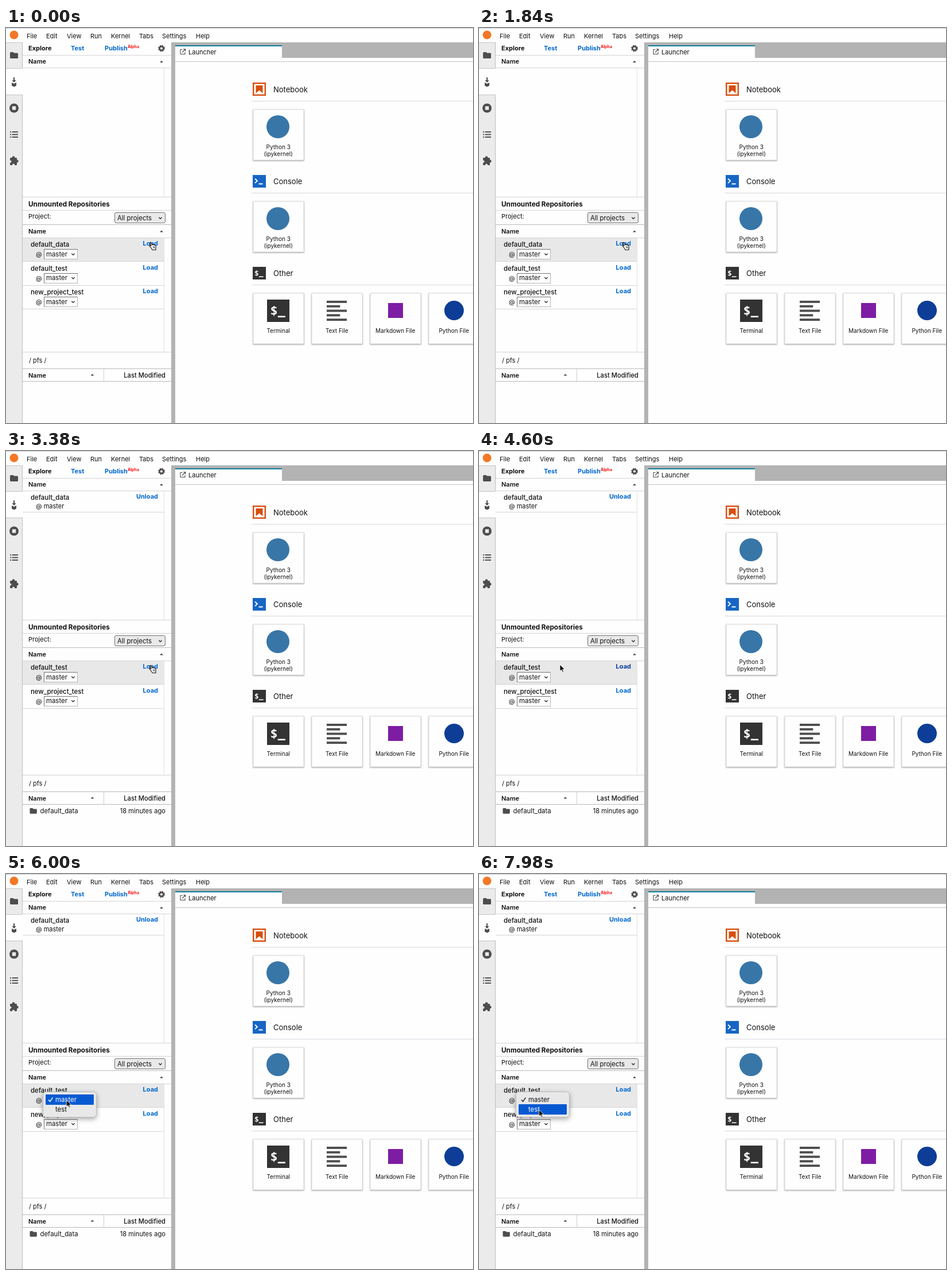
These frames come from a looping animation (814 px wide and 688 px high, 8 s). An HTML page:

```html
<!DOCTYPE html>
<html lang="en">
<head>
<meta charset="utf-8">
<title>Launcher</title>
<style>
html, body { margin: 0; width: 100%; height: 100%; overflow: hidden; background: #fefefe; }
svg { display: block; width: 814px; height: 688px; }
text { font: 11px Inter, "Open Sans", sans-serif; fill: #111; white-space: pre; }
.b { font-weight: 700; }
.m { font-weight: 600; }
.n { font-size: 11.4px; font-weight: 500; }
.v { font-size: 11.4px; }
.link { font-weight: 700; fill: #0067cf; }
.card { font-size: 10px; text-anchor: middle; }
.head { font-size: 13px; }
.mono { font-family: "Noto Sans Mono", monospace; font-weight: 600; fill: #fff; }
.end { text-anchor: end; }
.white { fill: #fff; }
.box { fill: #fefefe; stroke: #dedede; filter: drop-shadow(0 1px 1px #0006); }
</style>
</head>
<body>
<svg id="stage" viewBox="0 0 814 688" xmlns="http://www.w3.org/2000/svg"></svg>
<script>
const LOOP = 8000;
const rect = (x, y, w, h, fill, more = '') =>
  `<rect x="${x}" y="${y}" width="${w}" height="${h}" fill="${fill}" ${more}/>`;
const circle = (x, y, r, fill) => `<circle cx="${x}" cy="${y}" r="${r}" fill="${fill}"/>`;
const text = (x, y, s, cls = '', more = '') => `<text x="${x}" y="${y}" class="${cls}" ${more}>${s}</text>`;
const path = (d, stroke, width = 1, fill = 'none') =>
  `<path d="${d}" fill="${fill}" stroke="${stroke}" stroke-width="${width}"/>`;
const group = (id, body) => `<g id="${id}">${body}</g>`;
const hline = (x, y, w, color = '#d4d4d4') => rect(x, y, w, 1, color);
const chevron = (x, y) => path(`M${x - 2.6} ${y - 1.3}l2.6 2.7 2.6-2.7`, '#222', 1.3);
const sortMark = (x, y) => path(`M${x - 3} ${y + 1.5}l3-3 3 3z`, 'none', 0, '#444');
const folder = (x, y, s) =>
  `<path transform="translate(${x} ${y}) scale(${s})" fill="#4d4d4d" d="M1.5 0h4L7 1.6h5.5q1.5 0 1.5 1.5v6.4q0 1.5-1.5 1.5h-11Q0 11 0 9.5v-8Q0 0 1.5 0z"/>`;

function menuBar() {
  const items = { File: 36, Edit: 70, View: 106, Run: 147, Kernel: 183, Tabs: 232, Settings: 272, Help: 331 };
  return rect(0, 0, 814, 1, '#c9c9d6') + circle(14, 12, 7.5, '#f37726') +
    Object.entries(items).map(([name, x]) => text(x, 18, name)).join('');
}

function activityBar() {
  const ink = '#4d4d4d', bg = '#ebebeb';
  const list = [181, 185.5, 190].map(y => rect(7, y - .9, 2, 1.9, ink) + rect(10.5, y - .9, 10.5, 1.9, ink)).join('');
  const puzzle = rect(7, 226, 12, 13, ink, 'rx="1.2"') + circle(13, 225.6, 2.4, ink) + circle(19.2, 232, 2.4, ink) +
    circle(7.4, 232.6, 2.1, bg) + circle(13, 238.6, 2.1, bg);
  return rect(0, 25, 28, 663, bg) + hline(0, 25, 28, '#c4c4c4') + rect(28, 25, 1, 663, '#bdbdbd') +
    rect(0, 70, 29, 46, '#fefefe') + hline(0, 70, 28, '#c4c4c4') + hline(0, 116, 28, '#c4c4c4') +
    folder(7, 42, 1) + path('M14 86v6', ink, 2) + path('M10.4 91h7.2L14 95z', 'none', 0, ink) +
    path('M10 95l4 2 4-2v5.5l-4 2-4-2z', 'none', 0, ink) +
    circle(14, 139.5, 8, ink) + rect(10.8, 136.3, 6.4, 6.4, bg) + list + puzzle;
}

function sidebar() {
  const lines = [47, 69, 294, 317, 342, 365, 564, 593, 615].map((y, i) =>
    hline(29, y, 259, i === 4 || i === 7 || i === 8 ? '#b9b9b9' : '#d4d4d4')).join('');
  return lines + rect(275, 70, 1, 224, '#e2e2e2') + rect(275, 366, 1, 198, '#e2e2e2') + rect(170, 594, 1, 21, '#d0d0d0') +
    text(39, 39, 'Explore', 'b') + text(113, 39, 'Test', 'link') + text(172, 39, 'Publish', 'link') +
    text(212, 35, 'Alpha', 'b', 'style="font-size:7px;fill:#f11"') +
    '<circle cx="271" cy="35.5" r="4.9" fill="none" stroke="#4d4d4d" stroke-width="2" stroke-dasharray="2.3 1.55"/>' +
    '<circle cx="271" cy="35.5" r="3.4" fill="none" stroke="#4d4d4d" stroke-width="2.6"/>' +
    text(39, 62, 'Name', 'm') + sortMark(271, 58.5) +
    text(39, 310.5, 'Unmounted Repositories', 'b', 'style="font-size:11.75px"') +
    text(39, 332, 'Project:') +
    rect(189.5, 321.5, 88, 18, '#e9e9e9', 'rx="2.5" stroke="#747474"') +
    text(194, 334.5, 'All projects', 'v') + chevron(269, 331) +
    text(39, 358, 'Name', 'm') + sortMark(271, 354) +
    text(40, 583, '/ pfs /') +
    text(39, 609, 'Name', 'm') + sortMark(150.5, 604) +
    text(278, 609, 'Last Modified', 'end', 'style="font-weight:500;font-size:11.2px"');
}

function repoRow(index, name) {
  const y = 365 + index * 41.5;
  return (index ? '' : rect(29, 366, 246, 40, '#e8e8e8')) + hline(29, Math.round(y + 41), 246) +
    text(43, y + 16.3, name, 'n') + text(52, y + 33, '@') +
    rect(66.5, Math.round(y + 20) + .5, 58, 17, '#fefefe', 'stroke="#b5b5b5"') +
    path(`M66.5 ${Math.round(y + 37) + .5}v-17h58`, '#757575') +
    text(70, y + 32.7, 'master', 'v') + chevron(117, y + 29) +
    text(265, y + 14, 'Load', 'link end' + (index ? '' : ' first'));
}
const repoList = names => names.map((name, i) => repoRow(i, name)).join('');

function card(column, y, label, icon) {
  const x = 431 + column * 102;
  return rect(x, y, 88, 88, '#fefefe', 'class="box"') + icon +
    label.map((s, i) => text(x + 43.7, y + 69 + i * 12, s, 'card')).join('');
}

function launcher() {
  const kernel = y => card(0, y, ['Python 3', '(ipykernel)'], circle(474, y + 30, 20, '#3876a8'));
  const head = (y, s) => text(466, y + 5, s, 'head') + hline(428, y + 20, 386, '#d9d9e2');
  const textLines = [35, 23.3, 35, 23.3, 35].map((w, i) => rect(559, 475 + i * 7.8, w, 3.9, '#4d4d4d')).join('');
  return rect(288, 25, 7, 663, '#b3b3b3') + rect(295, 25, 519, 27, '#b3b3b3') +
    rect(295, 30, 186, 29, '#fefefe') + rect(295, 30, 186, 2, '#147f9b') + hline(295, 58, 519, '#c2c2c2') +
    path('M307.5 37.5h-3.5v8h8v-3.5M309 36.8h3.7v3.7M312.5 37l-5.5 5.5', '#4d4d4d', 1.1) + text(318, 46, 'Launcher') +
    head(107, 'Notebook') + head(267, 'Console') + head(427, 'Other') +
    rect(431.2, 96.2, 20.6, 20.6, '#fefefe', 'stroke="#d84e0c" stroke-width="2.4"') +
    path('M435.5 100h12v13.5l-6-5-6 5z', 'none', 0, '#d84e0c') +
    rect(430, 256, 23, 22, '#1766c4') + path('M434 262.5l4 3.8-4 3.8M440.5 271.5h7', '#fff', 1.8) +
    rect(430, 416, 23, 22, '#333') + text(433, 432, '$_', 'mono', 'style="font-size:13px"') +
    kernel(142) + kernel(302) +
    card(0, 462, ['Terminal'], rect(455, 473, 39, 39, '#333') + text(460.5, 500, '$_', 'mono', 'style="font-size:22px"')) +
    card(1, 462, ['Text File'], textLines) +
    card(2, 462, ['Markdown File'], rect(666, 479, 26, 26, '#7d1da4')) +
    card(3, 462, ['Python File'], circle(781, 492, 17, '#0d3d96'));
}

function popup() {
  const tick = color => path('M74 393.3l2.6 3 4.8-7', color, 1.5);
  return rect(64.5, 379.5, 93, 44, '#e8e8e8', 'rx="5" stroke="#bcbcbc" style="filter:drop-shadow(0 3px 4px #0005)"') +
    group('pickMaster', rect(69, 384, 84, 18, '#0759d2', 'rx="1"') + tick('#fff') +
      text(86, 397, 'master', 'v white') + text(86, 414, 'test', 'v')) +
    group('pickTest', rect(69, 401, 84, 18, '#0759d2', 'rx="1"') + tick('#222') +
      text(86, 397, 'master', 'v') + text(86, 414, 'test', 'v white'));
}

const stage = document.getElementById('stage');
stage.innerHTML = menuBar() + activityBar() + sidebar() + launcher() +
  group('before', repoList(['default_data', 'default_test', 'new_project_test'])) +
  group('after', text(43, 85, 'default_data', 'n') + text(52, 100, '@ master') +
    text(265, 83.3, 'Unload', 'link end') + hline(29, 106, 246) + repoList(['default_test', 'new_project_test'])) +
  group('file', folder(41.5, 622, .88) + text(59.5, 631, 'default_data', 'v') +
    text(278, 631, '18 minutes ago', 'end', 'style="font-size:11.2px"')) +
  group('popup', popup()) +
  group('hand', '<path transform="translate(250 373)" fill="#fff" stroke="#111" stroke-width="1.1" stroke-linejoin="round" d="M2.2 8.8L.5 7Q-.5 5.6 1 5.2L3 6.6 1 1.5Q.8 0 2.2.2L4.8 5 5.3 3.8 7 4.8 7.8 4.2 9 5.3 10.2 5Q12 8 11 10.8L11 13.5H5.2z"/>' +
    path('M256.4 380l.7 4M258.5 380l.5 4', '#111', .8)) +
  group('arrow', '<path fill="#000" stroke="#fff" stroke-width=".9" d="M0 0V11.6L2.7 9.1 4.5 13.2 6.5 12.3 4.7 8.4H8.4Z"/>');

const play = (el, frames) => el.animate(frames, { duration: LOOP, iterations: Infinity });

// Holds "on" between two times and "off" elsewhere, with hard changes.
function steps(prop, off, on, from, to) {
  const start = from > 0 ? off : on, end = to < LOOP ? off : on;
  const table = [[0, start], [from, on], [to, end], [LOOP, end]];
  return table.filter(([t], i) => !i || t > table[i - 1][0])
    .map(([t, value]) => ({ offset: t / LOOP, [prop]: value, easing: 'step-end' }));
}
const show = (id, from, to = LOOP) =>
  play(document.getElementById(id), steps('opacity', 0, 1, from, to));

const LOADED = 2200, LISTED = 2740, LEAVE = 4400, OPEN = 5800, SWITCH = 7240;
show('before', 0, LOADED);
show('after', LOADED);
show('file', LISTED);
show('hand', 0, LEAVE);
show('arrow', LEAVE);
show('popup', OPEN);
show('pickMaster', OPEN, SWITCH);
show('pickTest', SWITCH);
document.querySelectorAll('.first').forEach(el =>
  play(el, steps('fill', '#0067cf', '#0a3c9e', LEAVE, 4720)));

const pointer = [
  [0, 250, 375], [LEAVE, 238, 375], [4600, 141, 372], [4680, 138, 373], [5060, 105, 392],
  [OPEN, 105, 392], [6400, 107, 400], [7040, 107, 400], [7440, 104.5, 410.5], [LOOP, 104.5, 410.5]
];
play(document.getElementById('arrow'), pointer.map(([t, x, y]) =>
  ({ offset: t / LOOP, transform: `translate(${x}px, ${y}px)`, easing: 'ease-in-out' })));
</script>
</body>
</html>
```
